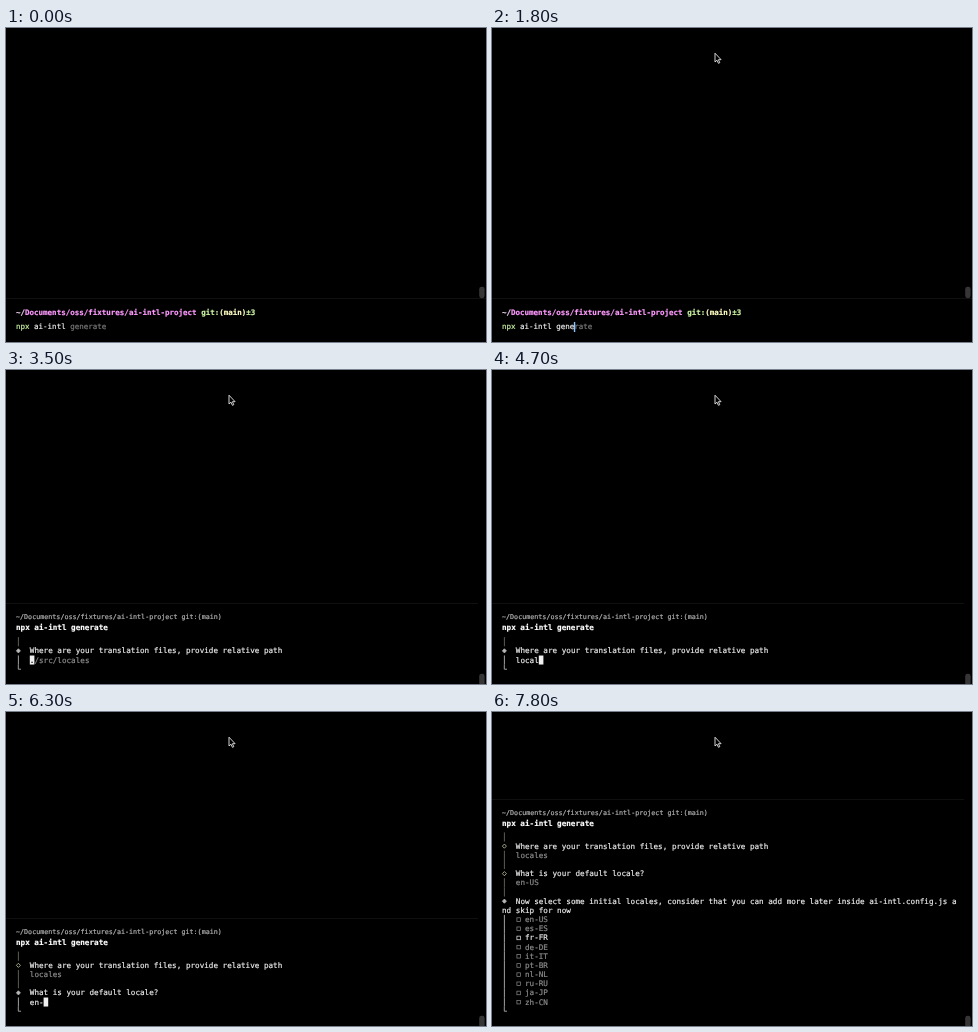
Write an HTML page that moves like this. It is 480x314 px and loops after 8 s.

```html
<!DOCTYPE html>
<html lang="en">
<head>
<meta charset="utf-8">
<title>Terminal session</title>
<style>
  html, body { margin: 0; width: 100%; height: 100%; overflow: hidden; background: #000; }
  svg { display: block; width: 480px; height: 314px; }
  text {
    font: 7.64px "DejaVu Sans Mono", "Liberation Mono", monospace;
    white-space: pre;
    text-rendering: geometricPrecision;
  }
  text, tspan { fill: currentColor; stroke: currentColor; stroke-width: .2px; }
  .prompt { font-size: 7.5px; }
  .small { font-size: 6.71px; }
  .bold { font-weight: bold; }
</style>
</head>
<body>
<svg id="stage" viewBox="0 0 480 314"></svg>
<script>
const LOOP = 8000, LEFT = 10, ADV = 4.6, ROW = 9.17, LAST_ROW = 299.2;
const WHITE = '#ececec', DIM = '#8c8c8c', GREEN = '#ccf5a4', PINK = '#ff98ff';
const LOCALES = ['en-US', 'es-ES', 'fr-FR', 'de-DE', 'it-IT', 'pt-BR', 'nl-NL', 'ru-RU', 'ja-JP', 'zh-CN'];
const stage = document.getElementById('stage');

const col = n => LEFT + n * ADV;
const rect = (x, y, w, h, fill, rx = 0) =>
  `<rect x="${x}" y="${y}" width="${w}" height="${h}" rx="${rx}" fill="${fill}"/>`;
const span = (s, color) => `<tspan color="${color}">${s}</tspan>`;
// y is the vertical middle of the line
const text = (x, y, s, color = WHITE, cls = '') =>
  `<text x="${x}" y="${y + 2.6}" color="${color}" class="${cls}">${s}</text>`;
const divider = (y, w) => rect(0, y, w, 1, '#101010');
const thumb = y => rect(473.2, y, 5.4, 11.4, '#363636', 2.4);
const typed = (t, times) => times.filter(at => t >= at).length;
const steps = (n, start, gap) => Array.from({ length: n }, (_, i) => start + i * gap);

// Rows are functions of their middle y
const bar = on => y => rect(11.9, y - ROW / 2, .9, ROW, on ? '#b0b0b0' : '#66665e');
const corner = y => `<path d="M12.3 ${y - ROW / 2}v4.6h2.7" fill="none" stroke="#b0b0b0" stroke-width=".9"/>`;
const cursor = y => rect(LEFT, y - 4.3, 4.9, 9.3, 'url(#blue)');
const question = (s, on) => y =>
  `<path d="M12.4 ${y - 2.1}l2 2.1-2 2.1-2-2.1z" fill="${on ? '#b8b8b8' : '#000'}" ` +
  `stroke="${on ? '#b8b8b8' : '#c8c8a0'}" stroke-width=".8"/>` + text(col(3), y, s);
const answer = s => y => bar(false)(y) + text(col(3), y, s, DIM);
const field = (value, hint) => y => {
  const x = col(3 + value.length);
  return bar(true)(y) + rect(x, y - 4.5, ADV, 9, '#f0f0f0') + (value
    ? text(col(3), y, value)
    : text(x, y, span(hint[0], '#000') + span(hint.slice(1), DIM)));
};
const option = (s, on) => y => {
  const c = on ? WHITE : DIM;
  return bar(true)(y) + text(col(5), y, s, c) +
    `<rect x="24.9" y="${y - 1.7}" width="3.6" height="3.6" fill="none" stroke="${c}" stroke-width=".7"/>`;
};

function prompt(t) {
  const word = 'generate', n = typed(t, steps(8, 1400, 130));
  const path = span('~/', '#f0d8f2') + span('Documents/oss/fixtures/ai-intl-project', PINK) +
    span(' git:', GREEN) + span('(main)', '#fefdc2') + span('±3', GREEN);
  const line = span('npx', GREEN) + span(' ai-intl ' + word.slice(0, n), WHITE) + span(word.slice(n), '#777');
  const caret = t >= 600 && t < 2400 ? rect(LEFT + (12 + n) * 4.515 - .4, 294, 1.4, 10, '#8cc4ff') : '';
  return divider(270, 480) + thumb(258.8) + text(LEFT, 284.3, path, WHITE, 'prompt bold') +
    text(LEFT, 298.7, line, WHITE, 'prompt') + caret;
}

function sessionRows(t) {
  if (t < 3200) return [cursor];
  const rows = [bar(false), question('Where are your translation files, provide relative path', t < 5100)];
  if (t < 5100) {
    const n = typed(t, steps(7, 4200, 115));
    return [...rows, field('locales'.slice(0, n), './src/locales'), corner];
  }
  rows.push(answer('locales'));
  if (t < 5200) return [...rows, cursor];

  rows.push(bar(false), question('What is your default locale?', t < 7000));
  if (t < 7000) {
    const n = typed(t, [6000, 6100, 6300, 6600, 6700]);
    return [...rows, field('en-US'.slice(0, n), 'en-US'), corner];
  }
  rows.push(answer('en-US'));
  if (t < 7100) return [...rows, cursor];

  const active = typed(t, [7600, 7800]);
  return [...rows, bar(false),
    question('Now select some initial locales, consider that you can add more later inside ai-intl.config.js a', true),
    y => text(LEFT, y, 'nd skip for now'),
    ...LOCALES.map((s, i) => option(s, i === active)), corner];
}

function session(t) {
  const rows = sessionRows(t), top = LAST_ROW - (rows.length - 1) * ROW;
  return divider(Math.round(top - 38.4), 472) + thumb(303.8) +
    text(LEFT, top - 24.8, '~/Documents/oss/fixtures/ai-intl-project git:(main)', '#b0b0b0', 'small') +
    text(LEFT, top - 14, 'npx ai-intl generate', '#fff', 'bold') +
    rows.map((row, i) => row(top + i * ROW)).join('');
}

const defs = '<defs><linearGradient id="blue"><stop stop-color="#58a8dc"/>' +
  '<stop offset="1" stop-color="#10a4f4"/></linearGradient></defs>';
const pointer = '<path d="M223 25.2v8.8l2-1.8 1.4 3.1 1.4-.6-1.4-3h2.7z" fill="#000" stroke="#e8e8e8" stroke-width=".9"/>';

let shown = '';
function draw(now) {
  const t = now % LOOP;
  const html = defs + (t < 2800 ? prompt(t) : session(t)) + (t >= 600 ? pointer : '');
  if (html !== shown) stage.innerHTML = shown = html;
  requestAnimationFrame(draw);
}
draw(performance.now());
</script>
</body>
</html>
```
